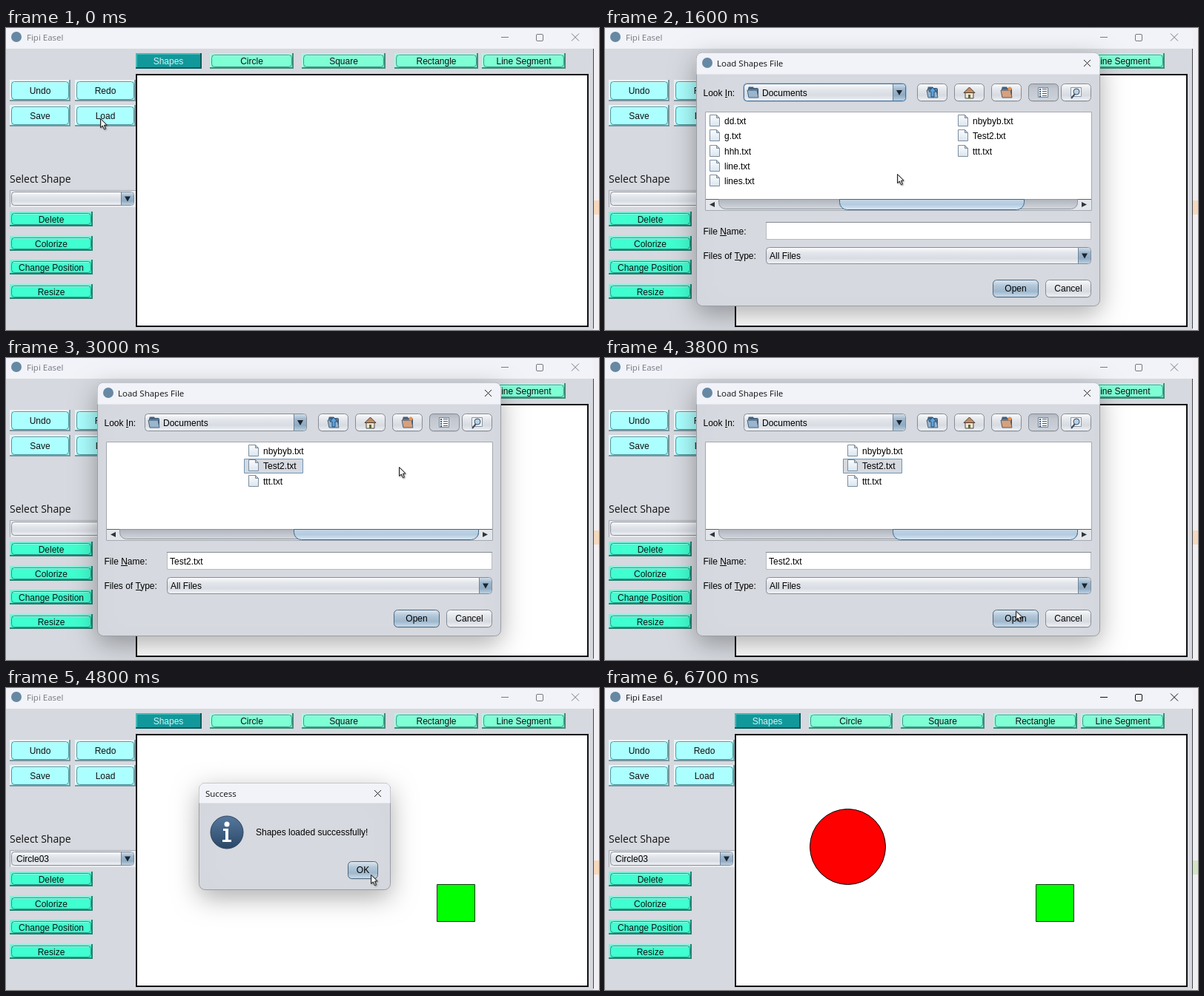
Recreate the animation shown at these times as an HTML page with a canvas. Size 800 px wide and 408 px high, loop 6800 ms.

```html
<!DOCTYPE html>
<html lang="en">
<head>
<meta charset="utf-8">
<title>Paint window</title>
<style>
  html, body { margin: 0; width: 100%; height: 100%; overflow: hidden; background: #d6d9df; }
  canvas { display: block; }
</style>
</head>
<body>
<canvas id="stage" width="800" height="408"></canvas>
<script>
const LOOP = 6800, STEP = 100;
const SANS = '12px "Liberation Sans", Arial, sans-serif';
const TITLE = '11.5px "Open Sans", "Noto Sans", sans-serif';
const PANEL = '#d6d9df';
const stage = document.getElementById('stage').getContext('2d');
const layer = document.createElement('canvas');
layer.width = 800;
layer.height = 408;
const layerCtx = layer.getContext('2d');
let c = stage;

const clamp = v => Math.max(0, Math.min(1, v));

function rect(x, y, w, h, fill) {
  c.fillStyle = fill;
  c.fillRect(x, y, w, h);
}

function box(x, y, w, h, r, fill, stroke) {
  c.beginPath();
  c.roundRect(x + .5, y + .5, w - 1, h - 1, r);
  c.fillStyle = fill;
  c.fill();
  if (stroke) {
    c.strokeStyle = stroke;
    c.lineWidth = 1;
    c.stroke();
  }
}

function shade(y, h, ...colors) {
  const g = c.createLinearGradient(0, y, 0, y + h);
  colors.forEach((col, i) => g.addColorStop(i / (colors.length - 1), col));
  return g;
}

function disc(x, y, r, fill, stroke) {
  c.beginPath();
  c.arc(x, y, r, 0, 7);
  c.fillStyle = fill;
  c.fill();
  if (stroke) {
    c.strokeStyle = stroke;
    c.lineWidth = 1;
    c.stroke();
  }
}

function poly(points, fill, stroke) {
  c.beginPath();
  points.forEach(([x, y]) => c.lineTo(x, y));
  c.closePath();
  if (fill) { c.fillStyle = fill; c.fill(); }
  if (stroke) { c.strokeStyle = stroke; c.lineWidth = 1; c.stroke(); }
}

function line(points, color, width = 1) {
  c.beginPath();
  points.forEach(([x, y], i) => i % 2 ? c.lineTo(x, y) : c.moveTo(x, y));
  c.strokeStyle = color;
  c.lineWidth = width;
  c.stroke();
}

// y is the vertical middle of the capitals
function text(s, x, y, color = '#000', align = 'left', font = SANS) {
  c.font = font;
  c.textAlign = align;
  c.fillStyle = color;
  c.fillText(s, x, Math.round(y + 4));
}

function label(s, y, key) {
  text(s, 132.5, y);
  const x = 132.5 + c.measureText(s.slice(0, key)).width;
  rect(Math.round(x), Math.round(y + 5), Math.round(c.measureText(s[key]).width), 1, '#000');
}

function closeMark(x, y, r, color) {
  line([[x - r, y - r], [x + r, y + r], [x + r, y - r], [x - r, y + r]], color);
}

function bevel(x, y, w, h, fill, light, dark, name) {
  rect(x, y, w, h, fill);
  rect(x, y, w, 2, light);
  rect(x, y, 2, h, light);
  rect(x, y + h - 2, w, 2, dark);
  rect(x + w - 2, y, 2, h, dark);
  if (!name) return;
  box(x + 2, y + 2, w - 4, h - 4, 4, fill, 'rgba(20,85,95,.6)');
  rect(x + 5, y + 3, w - 10, 1, 'rgba(255,255,255,.45)');
  text(name, x + w / 2, y + h / 2 + .5, '#111', 'center');
}

function triangle(x, y) {
  poly([[x - 4, y - 3], [x + 4, y - 3], [x, y + 4]], '#1b2530');
}

function combo(x, y, w, h, focus) {
  if (focus) box(x - 1, y - 1, w + 2, h + 2, 5, '#73a4d1');
  box(x, y, w, h, 4, shade(y, h, '#fdfdfe', '#e3e6eb', '#d8dce3', '#f3f5f8'), focus ? '#41719e' : '#868d97');
  c.save();
  c.beginPath();
  c.roundRect(x + w - 18, y + 1, 17, h - 2, [0, 4, 4, 0]);
  c.clip();
  rect(x + w - 18, y, 18, h, shade(y, h, '#d5e2ee', '#9db6cc', '#8faac2', '#c3d6e6'));
  rect(x + w - 18, y, 1, h, '#6f8499');
  c.restore();
  triangle(x + w - 9, y + h / 2);
}

function grayButton(x, y, w, h, mode) {
  const fills = {
    plain: ['#fcfcfd', '#e4e7eb', '#d7dbe1', '#f1f3f6'],
    down: ['#b2b7c0', '#c3c8d0', '#c8cdd5', '#d0d4da'],
    main: ['#e2ebf3', '#b3c7d8', '#9fb8cd', '#d0e0ed'],
    mainDown: ['#35536f', '#4c6f91', '#587c9f', '#7f9fbc']
  };
  box(x, y + 1, w, h, 5, '#b2b6bd');
  box(x, y, w, h, 5, shade(y, h, ...fills[mode]), mode.startsWith('main') ? '#4d6780' : '#858c96');
}

function folder(x, y, front = '#9ab5cc') {
  box(x + 1, y, 8, 5, 1, '#45627d');
  box(x + 1, y + 2, 14, 12, 1, '#5b7c9a', '#38536c');
  poly([[x, y + 5], [x + 13, y + 5], [x + 15, y + 15], [x + 2, y + 15]], front, '#46637f');
}

function page(x, y) {
  poly([[x + .5, y + .5], [x + 9.5, y + .5], [x + 13.5, y + 4.5], [x + 13.5, y + 15.5], [x + .5, y + 15.5]],
    shade(y, 16, '#fdfeff', '#d8e4ee'), '#7d8d9c');
  poly([[x + 9.5, y + .5], [x + 9.5, y + 4.5], [x + 13.5, y + 4.5]], '#b9cbdb', '#7d8d9c');
}

function toolIcons() {
  folder(434, 79);
  poly([[442, 80], [447, 86], [444, 86], [444, 93], [440, 93], [440, 86], [437, 86]], '#5fa3dd', '#254e78');

  poly([[486, 87], [497, 87], [497, 95], [486, 95]], '#efe6cf', '#4d4d4d');
  poly([[484, 87.5], [491.5, 80], [499, 87.5]], '#c08d5e', '#4d3a34');
  rect(490, 90, 3, 5, '#5a6b45');

  folder(534, 79, '#d9a07a');
  disc(546, 82, 2.5, '#ef9148');

  box(584, 80, 14, 14, 0, '#f4f7fa', '#6f8295');
  for (let i = 0; i < 4; i++) {
    rect(586, 82 + i * 3, 2, 2, '#40617f');
    rect(590, 82 + i * 3, 6, 1, '#40617f');
  }

  box(628, 80, 15, 13, 0, '#f0f3f6', '#8797a6');
  line([[634, 89], [629, 95]], '#3c4d5e', 2);
  disc(636, 86, 4, '#b7d2e8', '#3c4d5e');
}

function mainWindow(t) {
  const loaded = t >= 4200, active = t >= 5100;
  rect(0, 0, 800, 408, '#f1eff2');
  rect(0, 28, 793, 380, PANEL);
  box(-10, -1, 803, 29, [0, 7, 0, 0], '#f1f3f9');
  rect(792, 28, 1, 378, '#42454a');
  rect(793, 233, 7, 19, t >= 4200 && t < 4700 || t >= 6600 ? '#d3e6c2' : '#f6d8bd');

  const ink = active ? '#111' : '#777a80';
  disc(14, 12, 7, '#6688a3');
  text('Fipi Easel', 28, 12.5, ink, 'left', TITLE);
  rect(668, 12, 10, 1, ink);
  c.strokeStyle = ink;
  c.lineWidth = 1;
  c.beginPath();
  c.roundRect(715.5, 8.5, 9, 9, 1.5);
  c.stroke();
  closeMark(768, 12.5, 5, ink);

  bevel(175, 34, 89, 21, '#11989a', '#45b8b9', '#07595c');
  text('Shapes', 219, 45, '#d7f4f3', 'center');
  [['Circle', 275], ['Square', 399], ['Rectangle', 524], ['Line Segment', 642]].forEach(([name, x]) =>
    bevel(x, 34, 113, 21, '#7fffd4', '#b4f5e2', '#408d78', name));
  [['Undo', 5, 70], ['Redo', 93, 70], ['Save', 5, 104], ['Load', 93, 104]].forEach(([name, x, y]) =>
    bevel(x, y, 82, 29, '#abffff', '#e9f4f6', '#7d979f', name));
  ['Delete', 'Colorize', 'Change Position', 'Resize'].forEach((name, i) =>
    bevel(5, 248 + Math.round(i * 32.5), 112, 20, '#40ffd0', '#82eed9', '#28826f', name));

  text('Select Shape', 5, 204.5, '#111', 'left', '14px "Open Sans", "Noto Sans", sans-serif');
  rect(5, 219, 170, 23, '#e9ebef');
  rect(5, 219, 170, 1, '#a5a9b0');
  rect(5, 219, 1, 23, '#a5a9b0');
  combo(7, 221, 166, 19);
  if (loaded) text('Circle03', 14, 231);

  rect(175, 62, 611, 342, '#111');
  rect(177, 64, 607, 338, '#fff');
  if (loaded) {
    disc(327.5, 214.5, 51, '#f00', '#000');
    box(581, 265, 52, 51, 0, '#0f0', '#063806');
  }
}

function frame(x, y, w, h, titleH, name) {
  c.save();
  c.shadowColor = 'rgba(0,0,0,.32)';
  c.shadowBlur = 34;
  c.shadowOffsetY = 10;
  box(x, y, w, h, 8, PANEL, '#9a9ea6');
  c.restore();
  box(x, y, w, titleH, [8, 8, 0, 0], '#f1f3f9');
  text(name, x + (titleH > 28 ? 28 : 9), y + 15, '#111', 'left', TITLE);
  closeMark(x + w - 17.5, y + 14.5, 4.5, '#222');
}

const columns = [
  ['Tarvino', 'Custom Office Templates', 'VarNub', 'BrightHusk', 'Shortcut to Documents (NubCrate - Valendoria University)'],
  ['dd.txt', 'g.txt', 'hhh.txt', 'line.txt', 'lines.txt'],
  ['nbybyb.txt', 'Test2.txt', 'ttt.txt']
];

function fileList(t, picked) {
  const scroll = picked ? 484 : t >= 1100 ? 335 : 0;
  box(135, 113, 522, 134, 0, '#fff', '#a3a8b0');
  c.save();
  c.beginPath();
  c.rect(136, 114, 520, 117);
  c.clip();
  columns.forEach((names, col) => names.forEach((name, row) => {
    const x = 141 + col * 335 - scroll, y = Math.round(126 + row * 20.3);
    if (picked && name === 'Test2.txt') box(x - 6, y - 10, 80, 20, 0, PANEL, t < 4000 ? '#6d95ba' : PANEL);
    if (col) page(x, y - 9);
    else folder(x, y - 9);
    text(name, x + 20, y);
  }));
  c.restore();

  rect(136, 231, 520, 15, shade(231, 15, '#b8bdc5', '#d9dce2', '#e6e8ec'));
  rect(136, 231, 520, 1, '#5d646d');
  box(153, 231, 485, 14, [0, 0, 9, 9], shade(231, 14, '#aeb3bc', '#d4d8de'), '#8f959e');
  rect(136, 232, 17, 14, '#e3e6ea');
  rect(638, 232, 18, 14, '#e3e6ea');
  poly([[148, 235], [148, 242], [141, 238.5]], '#30363d');
  poly([[643, 235], [643, 242], [650, 238.5]], '#30363d');
  box(154 + Math.round(scroll * 234 / 484), 231, 250, 15, [0, 0, 10, 10],
    shade(231, 15, '#c3d5e5', '#b4cbdf', '#dbeefb'), '#3d688e');
}

function loadDialog(t) {
  const picked = t >= 2600, pressed = t >= 4000;
  frame(123, 33, 545, 343, 30, 'Load Shapes File');
  disc(138, 47, 7, '#6688a3');
  label('Look In:', 87.5, 5);
  combo(187, 75, 219, 24, !picked);
  folder(192, 79);
  text('Documents', 212, 87.5);
  [421, 471, 521, 571, 615].forEach((x, i) => grayButton(x, 75, 41, 24, i === 3 ? 'down' : 'plain'));
  toolIcons();
  fileList(t, picked);

  label('File Name:', 275, 5);
  box(217, 262, 439, 24, 0, '#fff', '#b5bac2');
  rect(217, 262, 439, 1, '#858b94');
  if (picked) text('Test2.txt', 221, 275);
  label('Files of Type:', 307.5, 9);
  combo(217, 296, 439, 23);
  text('All Files', 222, 307.5);

  grayButton(523, 340, 62, 24, pressed ? 'mainDown' : 'main');
  text('Open', 554, 352, pressed ? '#fff' : '#000', 'center');
  grayButton(594, 340, 62, 24, 'plain');
  text('Cancel', 625, 352, '#000', 'center');
}

function successDialog() {
  frame(260, 128, 259, 145, 28, 'Success');
  disc(298, 195, 22, shade(173, 44, '#56789d', '#2a4767'), '#29425d');
  disc(298, 184, 3.5, '#fff');
  rect(293, 190, 7, 3, '#fff');
  rect(296, 190, 4, 16, '#fff');
  rect(292, 205, 12, 3, '#fff');
  text('Shapes loaded successfully!', 337, 195);
  grayButton(461, 234, 41, 24, 'main');
  text('OK', 481.5, 246, '#000', 'center');
}

// Windows grow and fade in, then shrink slightly and fade out.
function popup(t, opens, closes, cx, cy, paint) {
  const p = clamp((t - opens) / 350), q = clamp((t - closes) / 250);
  if (!p || q === 1) return;
  const size = .92 + .08 * (1 - (1 - p) ** 2) - .023 * q;
  layerCtx.clearRect(0, 0, 800, 408);
  c = layerCtx;
  paint(t);
  c = stage;
  c.save();
  c.globalAlpha = Math.min(1, p * 1.17) * (1 - q ** 1.7);
  c.translate(cx, cy);
  c.scale(size, size);
  c.drawImage(layer, -cx, -cy);
  c.restore();
}

// time, x, y of the pointer tip
const path = [
  [0, 127, 122], [100, 127, 122], [500, 349, 161], [800, 394, 197], [1700, 394, 197],
  [2400, 530, 147], [3100, 530, 147], [3900, 555, 350], [4300, 555, 350], [4900, 487, 244],
  [5600, 487, 244], [6300, 500, 348], [6600, 506, 412], [LOOP, 506, 412]
];

function pointer(t) {
  const i = path.findIndex(k => k[0] > t);
  const [t0, x0, y0] = path[i - 1], [t1, x1, y1] = path[i];
  const p = (t - t0) / (t1 - t0), e = p * p * (3 - 2 * p);
  c.save();
  c.translate(x0 + (x1 - x0) * e, y0 + (y1 - y0) * e);
  c.shadowColor = 'rgba(0,0,0,.35)';
  c.shadowBlur = 2;
  c.shadowOffsetX = c.shadowOffsetY = 1;
  poly([[.5, .5], [.5, 12.5], [3.3, 10], [5.3, 14.8], [7.4, 13.9], [5.4, 9.2], [9, 9]], '#fff', '#222');
  c.restore();
}

function draw(now) {
  const t = Math.floor(now % LOOP / STEP) * STEP;
  mainWindow(t);
  popup(t, 200, 4180, 395.5, 204, loadDialog);
  popup(t, 4230, 5050, 389, 201, successDialog);
  pointer(t);
}

const start = performance.now();
function tick() {
  draw(performance.now() - start);
  requestAnimationFrame(tick);
}
tick();
</script>
</body>
</html>
```
